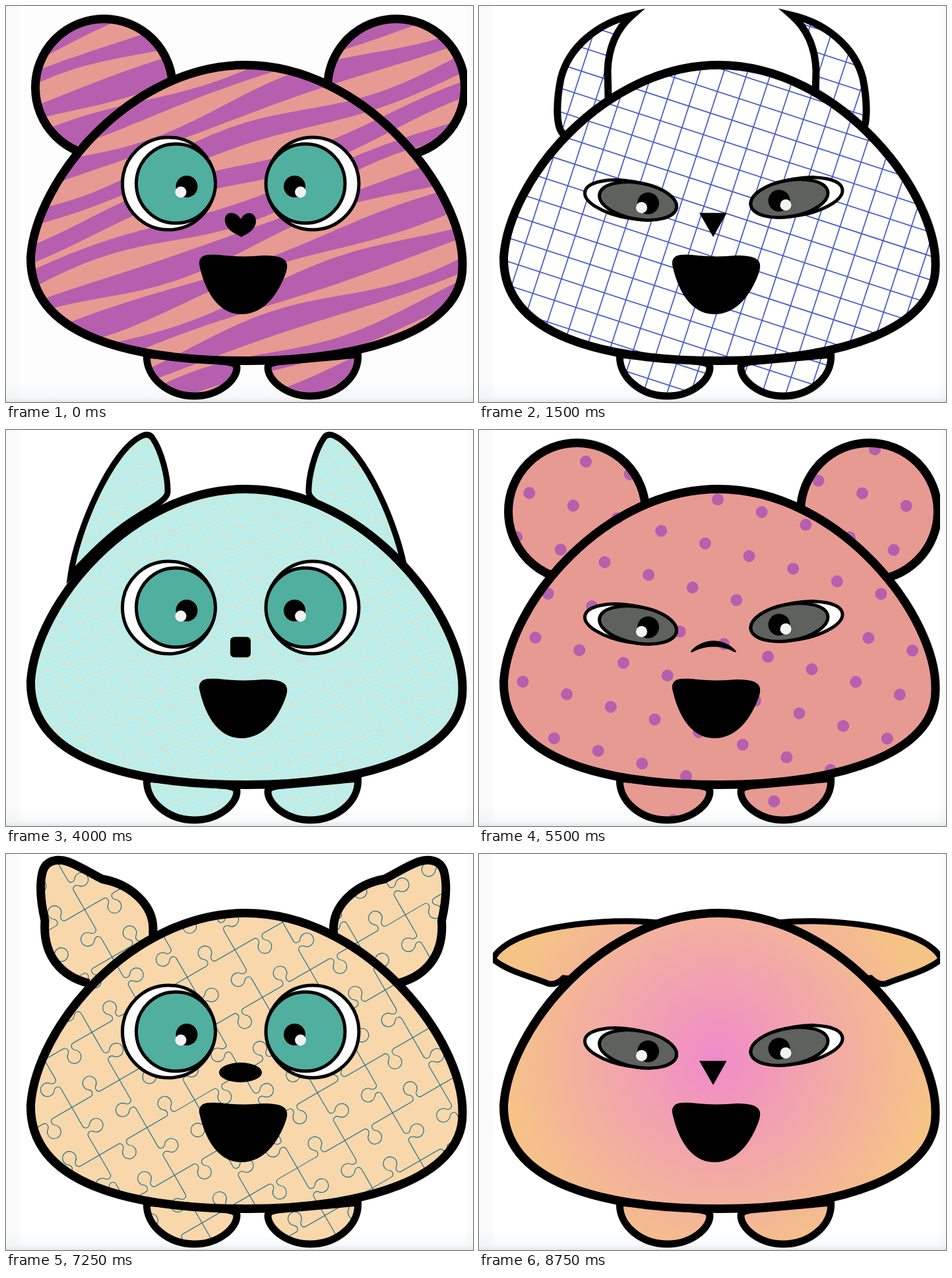
Recreate the animation shown at these times as an HTML page. Size 708 by 600 pixels, loop 9750 ms.

```html
<!DOCTYPE html>
<html lang="en">
<head>
<meta charset="utf-8">
<title>Creature mix</title>
<style>
  html, body { margin: 0; width: 100%; height: 100%; overflow: hidden; background: #fafafa; }
  svg { display: block; width: 100%; height: 100%; }
  .scene { visibility: hidden; animation: 9750ms step-end infinite; }
  .zebra { animation-name: zebra; }
  .grid { animation-name: grid; }
  .waves { animation-name: waves; }
  .dots { animation-name: dots; }
  .puzzle { animation-name: puzzle; }
  .glow { animation-name: glow; }
  .paper { fill: #fff; animation: paper 9750ms step-end infinite; }
  @keyframes zebra { 0% { visibility: visible } 15.3846% { visibility: hidden } }
  @keyframes grid { 15.3846% { visibility: visible } 41.0256% { visibility: hidden } }
  @keyframes waves { 41.0256% { visibility: visible } 56.4102% { visibility: hidden } }
  @keyframes dots { 56.4102% { visibility: visible } 74.3589% { visibility: hidden } }
  @keyframes puzzle { 74.3589% { visibility: visible } 89.7435% { visibility: hidden } }
  @keyframes glow { 89.7435%, 100% { visibility: visible } }
  @keyframes paper { 0%, 76.923% { fill: #fdfdfd } 15.3846%, 89.7435% { fill: #fff } }
</style>
</head>
<body>
<svg id="stage" viewBox="0 0 708 600" preserveAspectRatio="none"></svg>
<script>
const W = 708, H = 600;
const range = (from, to) => Array.from({ length: to - from + 1 }, (_, i) => from + i);
const each = (list, draw) => list.map(draw).join('');
const circle = (x, y, r, attrs = '') => `<circle cx="${x}" cy="${y}" r="${r}" ${attrs}/>`;
const sheet = (id, color, art) =>
  `<pattern id="${id}" width="${W}" height="${H}" patternUnits="userSpaceOnUse">
    <rect width="${W}" height="${H}" fill="${color}"/>${art}</pattern>`;

// Slanted bands whose course and thickness swell along x.
function zebra() {
  const xs = range(0, 60).map(i => i * 12);
  const band = k => {
    const mid = x => 235 + 50 * k - 0.35 * (x - 200) + 7 * Math.sin(x / 75 + k);
    const half = x => 11 + 6 * Math.sin(x / 70 + 1.9 * k);
    const upper = xs.map(x => `${x},${mid(x) - half(x)}`);
    const lower = xs.map(x => `${x},${mid(x) + half(x)}`).reverse();
    return `<polygon points="${[...upper, ...lower].join(' ')}"/>`;
  };
  return `<g fill="#e79a92">${each(range(-6, 11), band)}</g>`;
}

function grid() {
  const gap = 34.3;
  const lines = each(range(-20, 20), i => `M-700 ${i * gap}H700M${i * gap} -700V700`);
  return `<path transform="translate(266 423.2) rotate(18)" d="${lines}" stroke="#4259cb" stroke-width="1.7"/>`;
}

function dots() {
  const gap = 69.35;
  return `<g transform="translate(362 105.3) rotate(16)" fill="#b65fae">${
    each(range(-5, 8), i => each(range(-3, 8), j => circle(i * gap, j * gap, 9)))}</g>`;
}

function waves() {
  const r = 24, step = 17;
  const scale = (x, y) => each(range(0, 3), i => circle(x, y, r - 6 * i));
  const rows = each(range(-1, 4), k => each(k % 2 ? [-r, r, 3 * r] : [0, 2 * r], x => scale(x, k * step)));
  return `<pattern id="waves" width="${2 * r}" height="${2 * step}" patternUnits="userSpaceOnUse"
    patternTransform="rotate(16)"><rect width="${2 * r}" height="${2 * step}" fill="#aff3f8"/>
    <g fill="#aff3f8" stroke="#ecdcb8" stroke-width="1.4">${rows}</g></pattern>`;
}

function puzzle() {
  const s = 83.4;
  const tab = 'M0 0H33C38 0 40 -6 36 -10A10.3 10.3 0 1 1 47.4 -10C43.4 -6 45.4 0 50.4 0H83.4';
  const edge = (i, j, turn) =>
    `<path d="${tab}" transform="translate(${i * s} ${j * s}) rotate(${turn}) scale(1 ${(i + j) % 2 ? 1 : -1})"/>`;
  const edges = each(range(-7, 7), i => each(range(-5, 8), j => edge(i, j, 0) + edge(i, j, 90)));
  return `<g transform="translate(347 145) rotate(-30)" fill="none" stroke="#126a8a" stroke-width="1.1">${edges}</g>`;
}

const defs = `<defs>
  ${sheet('zebra', '#b65fae', zebra())}
  ${sheet('grid', '#fff', grid())}
  ${waves()}
  ${sheet('dots', '#e79a92', dots())}
  ${sheet('puzzle', '#f8d7ab', puzzle())}
  <radialGradient id="glow" gradientUnits="userSpaceOnUse" cx="361" cy="310" r="325">
    <stop stop-color="#f08bca"/><stop offset=".5" stop-color="#f2a8a8"/><stop offset="1" stop-color="#f5c386"/>
  </radialGradient>
  <linearGradient id="floor" x2="0" y2="1">
    <stop stop-color="#e9edf0" stop-opacity="0"/><stop offset=".7" stop-color="#e9edf0" stop-opacity=".35"/>
    <stop offset="1" stop-color="#e6e9ec"/>
  </linearGradient>
  <clipPath id="frame"><path d="M21 0H699V600H21Z"/></clipPath>
</defs>`;

// A left part and its mirror image; "sum" is twice the axis. Paths are mirrored by
// coordinates so that the skin pattern is not flipped.
const mirror = (path, sum) => path.replace(/([\d.]+) ([\d.]+)/g, (_, x, y) => `${sum - x} ${y}`);
const pair = (path, sum, width) =>
  `<path stroke-width="${width}" stroke-miterlimit="10" d="${path}${mirror(path, sum)}"/>`;
const both = (art, sum, dy = 0) => `${art}<g transform="translate(${sum} ${dy}) scale(-1 1)">${art}</g>`;

const body = `<path stroke-width="13" d="M37.5 380C46 262 190 89.5 363 89.5C545 89.5 696 282 692 395
  C692 490 545 537.5 365 537.5C190 537.5 35 500 37.5 380Z"/>`;
const feet = pair('M213.5 528C211 562 245 591 286 591C322 591 350 567 350 548C350 543 346 541 336 539Z', 747, 11);
const mouth = `<path d="M293 392C292 376 305 376 322 377C345 380 370 380 390 378C415 378 431 382 425 402
  C413 438 390 467 357 467C318 467 300 425 293 392Z"/>`;

const outlined = 'stroke="#000" stroke-width="5"';
const pupil = (x, y, gx, gy) => circle(x, y, 16.5) + circle(gx, gy, 8.5, 'fill="#f2f2f2"');
const tilted = (x, y, rx, ry, fill) =>
  `<ellipse rx="${rx}" ry="${ry}" transform="translate(${x} ${y}) rotate(10)" fill="${fill}" ${outlined}/>`;
const eyes = {
  round: both(circle(246.5, 269, 70, `fill="#fff" ${outlined}`) +
    circle(257.5, 269, 60, `fill="#51af9f" ${outlined}`) + pupil(274, 273.5, 265, 282), 711.5),
  sly: both(tilted(230, 293.7, 70.4, 27.8, '#fff') + tilted(241, 295.5, 59.2, 27.5, '#5f615f') +
    pupil(256.5, 299, 246.5, 305.5), 711.5, -4)
};

const noses = {
  heart: '<path d="M356 323C348 309 330 311 332 326C334 340 348 345 357 350C366 345 377 340 379 328C380 311 363 309 356 323Z"/>',
  triangle: '<path d="M334 313.5H375.5L355 350Z"/>',
  square: '<rect x="340" y="313.5" width="31" height="31" rx="6"/>',
  curve: '<path d="M321 335C340 314 371 314 390 335Q389 338 386 336C370 326 342 326 325 336Q321 338 321 335Z"/>',
  oval: '<ellipse cx="355.5" cy="331" rx="32.5" ry="15"/>'
};

const ears = {
  round: each([148.5, 591.5], x => circle(x, 123.5, 104, 'stroke-width="13"')),
  horns: pair('M128 194C116 184 117 145 124 110C136 62 180 26 232 14C208 35 196 65 195 98L196 140', 706, 11),
  pointed: pair('M98 220C108 150 160 30 206 9Q217 4 222 12C236 32 246 72 245 95C243 108 215 120 190 137C158 158 130 186 98 220Z', 704, 9),
  folded: pair('M126 196C85 186 55 155 59 101C52 70 50 45 56 25C62 8 80 7 95 12C115 20 130 30 146 38C190 46 224 78 223 115L223 135', 719.5, 13),
  floppy: pair('M270 104C200 97 90 107 44 136C26 148 18 158 26 163C50 180 80 186 104 196Q116 200 128 188L150 190', 722, 9)
};

const scenes = [
  ['zebra', 'round', 'round', 'heart'],
  ['grid', 'horns', 'sly', 'triangle'],
  ['waves', 'pointed', 'round', 'square'],
  ['dots', 'round', 'sly', 'curve'],
  ['puzzle', 'folded', 'round', 'oval'],
  ['glow', 'floppy', 'sly', 'triangle']
];
const scene = ([skin, ear, eye, nose]) =>
  `<g class="scene ${skin}"><g fill="url(#${skin})" stroke="#000">${ears[ear]}${feet}${body}</g>
    ${eyes[eye]}${noses[nose]}${mouth}</g>`;

document.getElementById('stage').innerHTML = `${defs}
  <rect width="${W}" height="${H}" fill="#fafafa"/>
  <rect class="paper" x="21" width="678" height="${H}"/>
  <rect y="572" width="${W}" height="28" fill="url(#floor)"/>
  <g clip-path="url(#frame)">${each(scenes, scene)}</g>`;
</script>
</body>
</html>
```
